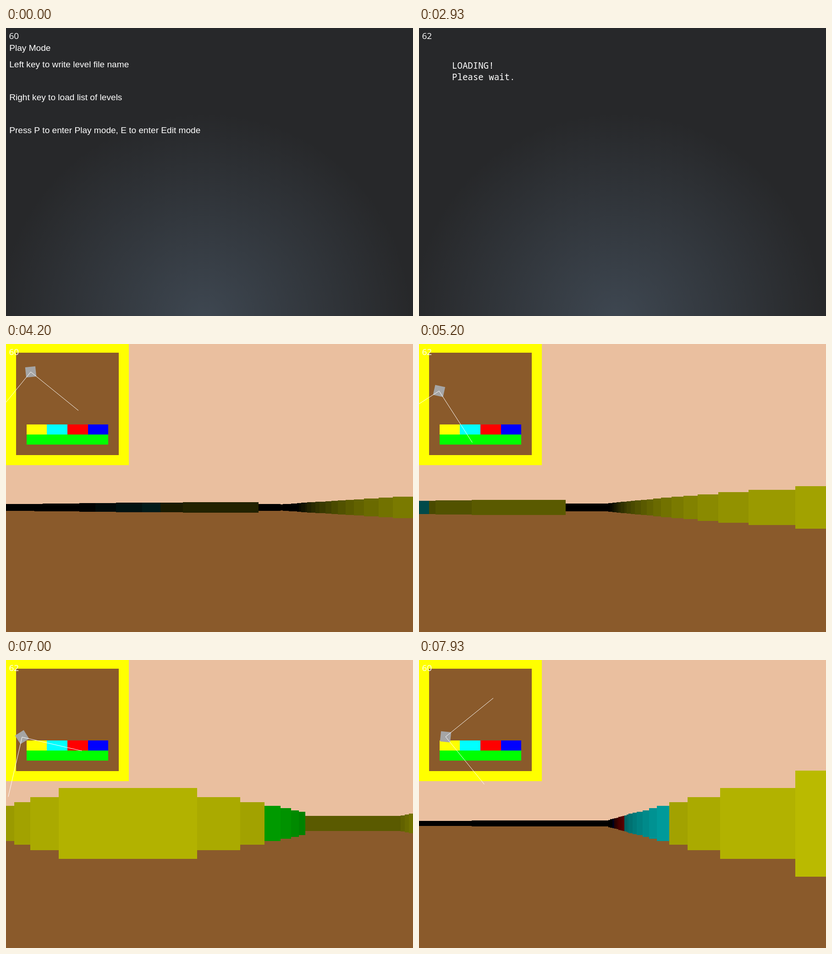
Animation, 888 px wide and 630 px high, one loop 8 s. Source, as an HTML page with a canvas:

```html
<!DOCTYPE html>
<html lang="en">
<head>
<meta charset="utf-8">
<title>Raycaster level</title>
<style>
  html, body { margin: 0; width: 100%; height: 100%; overflow: hidden; background: #27282a; }
  canvas { display: block; }
</style>
</head>
<body>
<canvas id="stage" width="888" height="630"></canvas>
<script>
const ctx = document.getElementById('stage').getContext('2d');
const W = 888, H = 630, LOOP = 8000, FPS = 15;
const MENU = '19.1px "Liberation Sans", Arial, sans-serif';
const MONO = '19.1px "Noto Sans Mono", "DejaVu Sans Mono", monospace';
const DIGITS = '19px "Open Sans", "Noto Sans", sans-serif';

// Level: y yellow, c cyan, r red, b blue, g green
const EDGE = 'y'.repeat(12), OPEN = 'y..........y';
const MAP = [EDGE, ...Array(7).fill(OPEN), 'y.yyccrrbb.y', 'y.gggggggg.y', OPEN, EDGE];
const RGB = { y: [1, 1, 0], c: [0, 1, 1], r: [1, 0, 0], b: [0, 0, 1], g: [0, 1, 0] };
const CELL = 22.333, TOP = -3, STEP = CELL / 4;
const RAYS = 200, HORIZON = 357.5, WALL = 464;
const FLOOR = '#8a5a2b', SKY = '#eabf9f';

// Stops on the walk: steady motion between them, turning mostly at the start
const WALK = [
  { t: 3466, x: 44.67, y: 41.67, dir: 90 },
  { t: 4200, x: 54, y: 61, dir: 84.1 },
  { t: 5200, x: 43.87, y: 102.75, dir: 102.3 },
  { t: 6466, x: 35.65, y: 157, dir: 106.5 },
  { t: 6733, x: 35.06, y: 168.7, dir: 106.5 },
  { t: 7000, x: 35.06, y: 168.7, dir: 58 },
  { t: 7800, x: 56, y: 168, dir: -3.9 },
  { t: 7933, x: 58, y: 167.94, dir: 5.9 }
];

// Moments at which the frame counter switches between 60 and 62
const FLIPS = [530, 1530, 2070, 3530, 4530, 6130, 7000, 7530];

const rad = deg => deg * Math.PI / 180;
const mix = (a, b, k) => a + (b - a) * k;
const easeOut = k => 1 - (1 - k) ** 2;
const pastCount = (times, t) => times.filter(at => t >= at).length;
const shade = (kind, light) => `rgb(${RGB[kind].map(c => c * light)})`;

function poseAt(t) {
  const i = Math.min(Math.max(1, WALK.findLastIndex(stop => stop.t <= t) + 1), WALK.length - 1);
  const a = WALK[i - 1], b = WALK[i];
  const k = Math.min(1, Math.max(0, (t - a.t) / (b.t - a.t)));
  return [mix(a.x, b.x, k), mix(a.y, b.y, k), mix(a.dir, b.dir, easeOut(k))];
}

function rect(color, x, y, w, h) {
  ctx.fillStyle = color;
  ctx.fillRect(x, y, w, h);
}

// Fills a box given by its edges, snapped to whole pixels
function box(color, ...edges) {
  const [l, t, r, b] = edges.map(Math.round);
  rect(color, l, t, r - l, b - t);
}

function text(font, str, x, y) {
  ctx.font = font;
  ctx.fillStyle = '#fff';
  ctx.fillText(str, x, y);
}

function backdrop() {
  const glow = ctx.createRadialGradient(434, 636, 0, 434, 636, 450);
  glow.addColorStop(0, '#3e4751');
  glow.addColorStop(1, '#27282a');
  rect(glow, 0, 0, W, H);
}

function menu() {
  text(MENU, 'Play Mode', 7.2, 50);
  text(MENU, 'Left key to write level file name', 7.2, 86);
  text(MENU, 'Right key to load list of levels', 7.2, 158);
  text(MENU, 'Press P to enter Play mode, E to enter Edit mode', 7.2, 230);
}

function levelList(t) {
  const y = 295 + 21.6 * pastCount([2130, 2400], t);
  for (let i = 0; i < 6; i++) text(MONO, `level_0${i + 1}.txt`, 24, y + i * 21.6);
}

function loading() {
  text(MONO, 'LOADING!', 72, 89);
  text(MONO, 'Please wait.', 72, 114);
}

// Walks in fixed steps until inside a wall
function cast(x, y, angle) {
  const dx = Math.cos(angle) * STEP, dy = Math.sin(angle) * STEP;
  let n = 0, kind;
  do {
    n++;
    kind = MAP[Math.floor((y + n * dy - TOP) / CELL)][Math.floor((x + n * dx) / CELL)];
  } while (kind === '.');
  return { n, kind };
}

function view(x, y, dir) {
  rect(SKY, 0, 0, W, H);
  box(FLOOR, 0, HORIZON, W, H);
  const w = W / RAYS;
  for (let i = 0; i < RAYS; i++) {
    const { n, kind } = cast(x, y, rad(dir - 45 + i * 90 / RAYS));
    const light = Math.max(0, 202 - 8 * n), half = WALL / n / 2;
    box(shade(kind, light), i * w, HORIZON - half, (i + 1) * w, HORIZON + half);
  }
}

function minimap(x, y, dir) {
  MAP.forEach((row, r) => [...row].forEach((kind, c) => {
    const color = kind === '.' ? FLOOR : shade(kind, 255);
    box(color, c * CELL, TOP + r * CELL, (c + 1) * CELL, TOP + (r + 1) * CELL);
  }));
  ctx.save();
  ctx.translate(x, y);
  ctx.rotate(rad(dir));
  rect('#a5a5a5', -CELL / 2, -CELL / 2, CELL, CELL);
  ctx.restore();

  ctx.strokeStyle = '#fff';
  ctx.beginPath();
  for (const side of [-45, 45]) {
    const a = rad(dir + side);
    ctx.moveTo(x, y);
    ctx.lineTo(x + Math.cos(a) * 6 * CELL, y + Math.sin(a) * 6 * CELL);
  }
  ctx.stroke();
}

function draw(t) {
  if (t < 3000) {
    backdrop();
    if (t < 1200) menu();
    else if (t < 2800) levelList(t);
    else loading();
  } else {
    const pose = poseAt(Math.floor((t + 5) * FPS / 1000) * 1000 / FPS);
    view(...pose);
    minimap(...pose);
  }
  text(DIGITS, pastCount(FLIPS, t) % 2 ? '62' : '60', 6.5, 24);
}

const start = performance.now();
function tick() {
  draw((performance.now() - start) % LOOP);
  requestAnimationFrame(tick);
}
tick();
</script>
</body>
</html>
```
